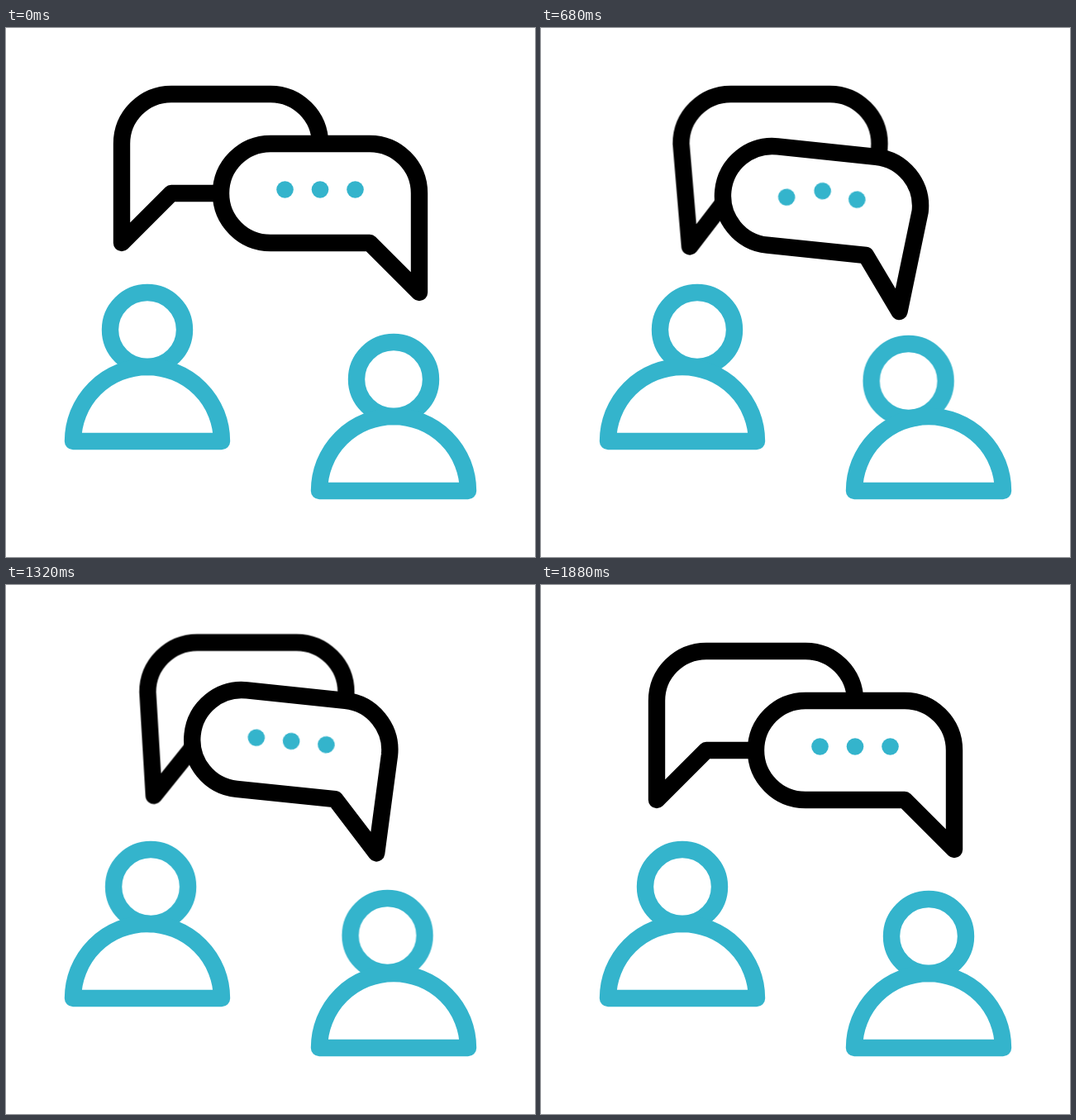
Recreate the animation shown at these times as an HTML page without scripts. Size 640x640 px, loop 2 s.

```html
<!DOCTYPE html>
<html lang="en">
<head>
<meta charset="utf-8">
<title>Conversation</title>
<style>
  html, body { margin: 0; width: 100%; height: 100%; overflow: hidden; background: #fff; }
  svg { display: block; width: 100%; height: 100%; }

  .line { fill: none; stroke-width: 20.4; stroke-linecap: round; stroke-linejoin: round; }
  .person { stroke: #34b4cc; }
  .bubble { stroke: #000; fill: #fff; }
  .dots { fill: #34b4cc; transform-origin: 337.5px 195.5px; }

  .head-a, .head-b, .back, .tail, .front, .dots, .dot {
    animation: 2s ease-in-out infinite;
  }
  .head-a { animation-name: head-a; }
  .head-b { animation-name: head-b; }
  .back { animation-name: back; }
  .tail { animation-name: tail; }
  .front { animation-name: front; }
  .dots { animation-name: dots; }
  .dot { animation-name: bob; }
  .dot:nth-child(2) { animation-delay: .1s; }
  .dot:nth-child(3) { animation-delay: .2s; }

  /* Lean in, hop, lean again, return */
  @keyframes head-a {
    0%, 16%, 93.5%, 100% { transform: translate(0, 0); }
    29.5%, 48%, 73.5%, 74.5% { transform: translate(18px, 0); }
    61% { transform: translate(-3px, 0); }
  }
  @keyframes head-b {
    0%, 4%, 93.5%, 100% { transform: translate(0, 0); }
    18%, 48%, 73.5%, 74.5% { transform: translate(-24.4px, 2px); }
    61% { transform: translate(1.2px, -2.6px); }
  }
  @keyframes back {
    0%, 16%, 93.5%, 100% { transform: translate(0, 0); }
    29.5%, 48%, 73.5%, 74.5% { transform: translate(29.5px, 0); }
    61% { transform: translate(32.4px, -15.8px); }
  }
  @keyframes tail {
    0%, 16%, 93.5%, 100% {
      d: path("M200 80L320 80A60 60 0 0 1 380 140A60 60 0 0 1 320 200L200 200L140 260L140 140A60 60 0 0 1 200 80Z");
    }
    29.5%, 48%, 73.5%, 74.5% {
      d: path("M200 80L320 80A60 60 0 0 1 380 140A60 60 0 0 1 320 200L200 200L150.5 264.5L140 140A60 60 0 0 1 200 80Z");
    }
    61% {
      d: path("M200 80L320 80A60 60 0 0 1 380 140A60 60 0 0 1 320 200L200 200L146 265.7L140 140A60 60 0 0 1 200 80Z");
    }
  }
  @keyframes front {
    0%, 4%, 93.5%, 100% {
      d: path("M320 140L440 140A60 60 0 0 1 500 200L500 320L440 260L320 260A60 60 0 0 1 260 200A60 60 0 0 1 320 140Z");
    }
    4% { animation-timing-function: ease-in; }
    10% {
      d: path("M295 142L426 146A60 60 0 0 1 484 208L479 328L422 266L291 262A60 60 0 0 1 233 200A60 60 0 0 1 295 142Z");
      animation-timing-function: ease-out;
    }
    18%, 48%, 73.5%, 74.5% {
      d: path("M286.2 143.3L405.2 155.8A60 60 0 0 1 458.7 221.8L433.5 343L393 275L273.8 262.7A60 60 0 0 1 220.3 196.8A60 60 0 0 1 286.2 143.3Z");
    }
    61% {
      d: path("M294.2 119.3L413.2 131.8A60 60 0 0 1 466.7 197.8L455.7 315L401 251L281.8 238.7A60 60 0 0 1 228.3 172.8A60 60 0 0 1 294.2 119.3Z");
    }
  }
  @keyframes dots {
    0%, 4%, 93.5%, 100% { transform: translate(0, 0) rotate(0deg); }
    4% { animation-timing-function: ease-in; }
    10% { transform: translate(-28.5px, 2.4px) rotate(2.2deg); animation-timing-function: ease-out; }
    18%, 48%, 73.5%, 74.5% { transform: translate(-39.9px, 4.7px) rotate(5.9deg); }
    61% { transform: translate(-32px, -18.7px) rotate(5.7deg); }
  }
  @keyframes bob {
    0%, 22.5%, 43%, 100% { transform: translate(0, 0); }
    28% { transform: translate(0, -8px); }
    35% { transform: translate(0, 5px); }
  }
</style>
</head>
<body>
<svg viewBox="0 0 640 640">
  <g class="line person">
    <circle class="head-a" cx="171" cy="365" r="45"/>
    <path d="M81 500A90 90 0 0 1 261 500Z"/>
    <circle class="head-b" cx="469" cy="425" r="45"/>
    <path d="M379 560A90 90 0 0 1 559 560Z"/>
  </g>
  <g class="back">
    <path class="line bubble tail" d="M200 80L320 80A60 60 0 0 1 380 140A60 60 0 0 1 320 200L200 200L140 260L140 140A60 60 0 0 1 200 80Z"/>
  </g>
  <path class="line bubble front" d="M320 140L440 140A60 60 0 0 1 500 200L500 320L440 260L320 260A60 60 0 0 1 260 200A60 60 0 0 1 320 140Z"/>
  <g class="dots">
    <circle class="dot" cx="337.5" cy="195.5" r="10.3"/>
    <circle class="dot" cx="380" cy="195.5" r="10.3"/>
    <circle class="dot" cx="422.5" cy="195.5" r="10.3"/>
  </g>
</svg>
</body>
</html>
```
